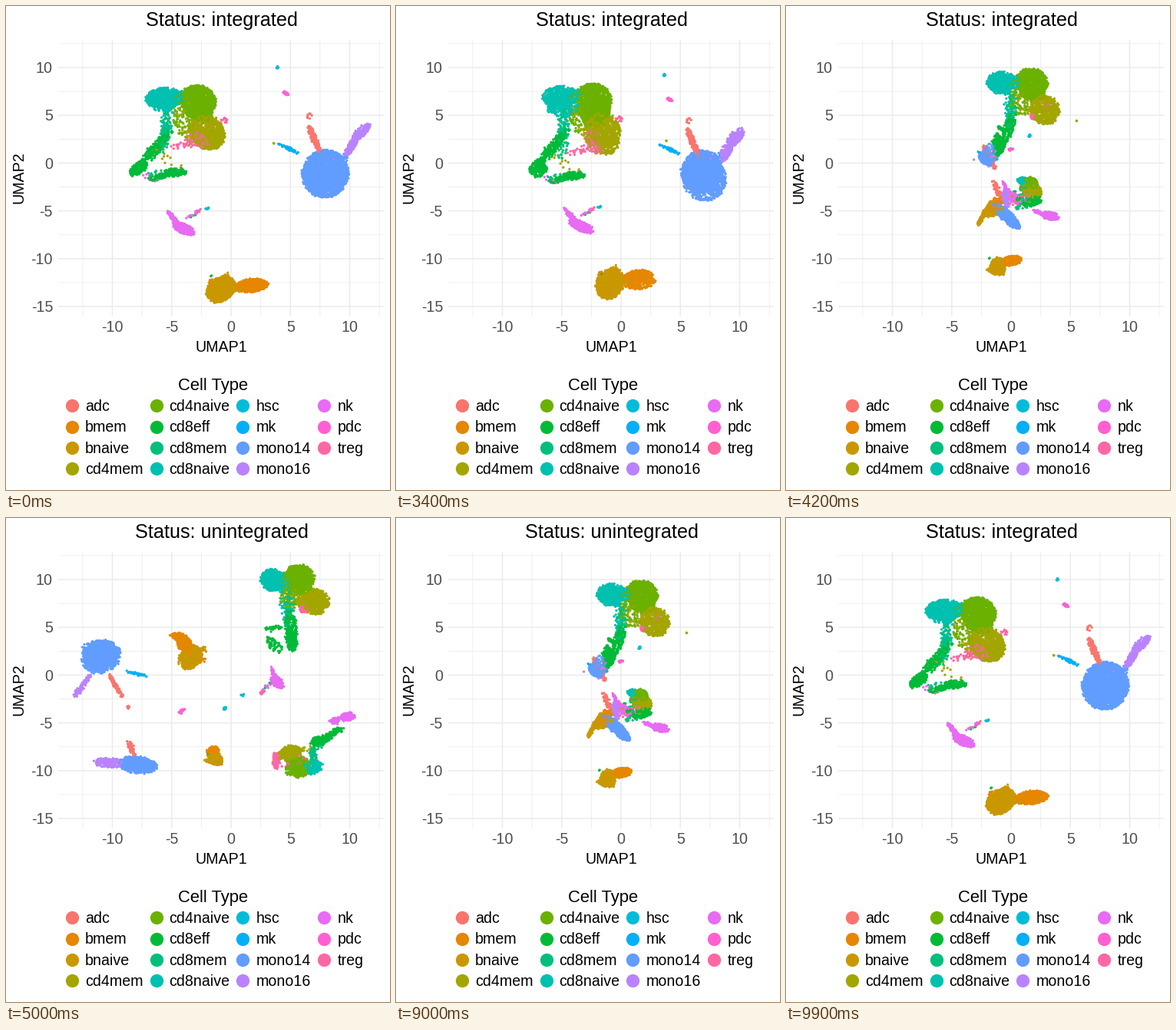
These frames come from a looping animation (500 px wide and 630 px high, 10 s). A matplotlib script:

```python
import numpy as np
import matplotlib.pyplot as plt
from matplotlib.animation import FuncAnimation

W, H, DPI = 500, 630, 100
FRAMES, INTERVAL = 100, 100
PT = 72 / DPI  # points per pixel

COLORS = {
    "adc": "#F8766D", "bmem": "#E58700", "bnaive": "#C99800", "cd4mem": "#A3A500",
    "cd4naive": "#6BB100", "cd8eff": "#00BA38", "cd8mem": "#00BF7D", "cd8naive": "#00C0AF",
    "hsc": "#00BCD8", "mk": "#00B0F6", "mono14": "#619CFF", "mono16": "#B983FF",
    "nk": "#E76BF3", "pdc": "#FD61D1", "treg": "#FF67A4",
}

plt.rcParams["font.family"] = "Liberation Sans"
rng = np.random.default_rng(7)


def px(x):
    return 293 + 15.45 * x


def py(y):
    return 204.5 - 12.44 * y


# Each group of cells fills an ellipse in both embeddings. An ellipse is
# (axis start, axis end, half width); a negative width mirrors it.

def disc(n):
    return np.sqrt(rng.random(n)) * np.exp(2j * np.pi * rng.random(n))


def place(p, ellipse):
    a, b, w = ellipse
    half = (b - a) / 2
    fuzz = min(0.04, abs(w) * 0.4)
    noise = fuzz * (rng.normal(size=p.size) + 1j * rng.normal(size=p.size))
    return (a + b) / 2 + half * p.real + 1j * half / abs(half) * w * p.imag + noise


starts, ends, hues = [], [], []


def cells(kind, n, start, end):
    p = disc(n)
    starts.append(place(0.98 * p, start))
    ends.append(place(0.92 * p + 0.14 * disc(n), end))
    hues.extend([COLORS[kind]] * n)


def spot(c, r=0.1):
    return c - r, c + r, r


# Monocytes
mono = (8.1 + 1.45j, 7.8 - 3.65j, 1.97)
cells("mono14", 1100, mono, (-12 + 0.5j, -9.9 + 3.4j, 1.58))
cells("mono14", 160, (9.6 - 0.9j, 6.3 - 0.9j, 1.8), (-12.5 + 2.9j, -9.6 + 2.9j, 0.75))
cells("mono14", 950, mono, (-9.5 - 9.2j, -6.2 - 9.6j, -0.85))
cells("mono14", 90, (9.6 + 1j, 8.6 - 0.8j, 0.6), (-11.9 + 3.2j, -11 + 0.2j, 0.6))
mono16, tip = (9.6 + 0.7j, 10.7 + 2.9j, 0.28), (10.3 + 2.4j, 11.65 + 4.15j, 0.4)
cells("mono16", 60, mono16, (-11.8 + 0.1j, -12.9 - 1.8j, 0.17))
cells("mono16", 50, tip, (-12.5 - 1.2j, -13.2 - 2.3j, 0.25))
cells("mono16", 120, mono16, (-8.9 - 9.2j, -10.8 - 9.2j, 0.5))
cells("mono16", 150, tip, (-9.8 - 9.2j, -11.5 - 9.1j, 0.5))
cells("mono16", 6, (6.5 - 2j, 9 + 0.5j, 1), (-12 + 1j, -10 + 2j, 0.8))

# Dendritic cells, platelets, progenitors
adc = (6.5 + 4.0j, 7.5 + 1.1j, 0.24)
cells("adc", 90, adc, (-10.35 + 0.2j, -9.1 - 2.4j, 0.15))
cells("adc", 60, adc, (-8.7 - 6.7j, -8.1 - 8.6j, 0.2))
cells("adc", 8, spot(6.6 + 4.9j, 0.3), spot(-8.65 - 3.35j, 0.2))
cells("mk", 38, (3.85 + 2.15j, 5.75 + 1j, 0.1), (-8.9 + 0.45j, -7 - 0.15j, 0.14))
cells("hsc", 10, spot(3.95 + 10j), spot(-0.5 - 3.5j, 0.14))
cells("hsc", 6, (-2.2 - 4.8j, -1.6 - 4.6j, 0.06), (0.8 - 2.1j, 1.4 - 2j, 0.08))
cells("pdc", 26, (4.4 + 7.4j, 4.85 + 7.2j, 0.15), (-4.3 - 4.1j, -4 - 3.5j, 0.18))

# B cells
bmem, bnaive = (0.3 - 13j, 3.1 - 12.6j, 0.68), (-1.6 - 14.5j, -0.1 - 11.9j, 1.1)
cells("bmem", 240, bmem, (-3.4 + 2.1j, -4.4 + 4.3j, 0.62))
cells("bmem", 100, (3 - 12.7j, 1.2 - 12.7j, 0.6), (-5.25 + 4.2j, -3.6 + 3.9j, 0.35))
cells("bmem", 200, bmem, (-2 - 8.2j, -1.1 - 7.6j, 0.4))
cells("bmem", 14, spot(-1.6 - 12.6j, 0.4), (-2.7 + 1.2j, -2 + 1.8j, 0.2))
cells("bnaive", 520, bnaive, (-3.9 + 0.6j, -3 + 3.1j, -0.92))
cells("bnaive", 80, (-1 - 13.6j, 1 - 13.2j, 0.35), (-3.2 + 1.5j, -2.2 + 2.9j, 0.35))
cells("bnaive", 35, (-0.8 - 12.5j, -0.3 - 11.5j, 0.3), (-3.6 + 0.5j, -2.9 + 2j, 0.4))
cells("bnaive", 360, bnaive, (-0.9 - 9.3j, -1.8 - 8.1j, 0.55))
cells("bnaive", 80, (-1.8 - 13.6j, -0.2 - 14.1j, 0.4), (-2.3 - 8.9j, -0.55 - 9.3j, 0.2))

# CD4 T cells
cd4n, cd4m = (-2.9 + 8.15j, -2.6 + 4.6j, 1.5), (-2.5 + 5.0j, -1.5 + 1.4j, 1.45)
cells("cd4naive", 720, cd4n, (5.3 + 11.5j, 6.2 + 8.9j, 1.28))
cells("cd4naive", 130, (-3.7 + 5.3j, -1.5 + 4.7j, 0.8), (4.8 + 9j, 7 + 9.1j, 0.7))
cells("cd4naive", 60, (-4.1 + 7.6j, -2 + 7.8j, 0.4), (4.6 + 11j, 6.5 + 11.2j, 0.35))
cells("cd4naive", 110, (-4.4 + 7.6j, -3.8 + 2.6j, 0.9), (4.6 + 10.2j, 5.1 + 6.8j, 0.8))
cells("cd4naive", 430, cd4n, (4.9 - 10.5j, 6.4 - 8.7j, 1.05))
cells("cd4mem", 560, cd4m, (7.2 + 9j, 7.1 + 6.3j, 1.15))
cells("cd4mem", 70, (-3.4 + 1.9j, -3 + 4.5j, 0.6), (5.8 + 8.7j, 6.3 + 6.9j, 0.5))
cells("cd4mem", 40, (-4.6 + 6.5j, -3 + 2j, 0.8), (5.2 + 9.5j, 6 + 6.8j, 0.8))
cells("cd4mem", 300, cd4m, (4 - 8.6j, 5.9 - 7.8j, 0.8))
cells("cd4mem", 2, spot(3.6 + 2j, 0.08), spot(7.2 + 6.5j))
cells("cd4mem", 12, (-6.6 + 1.5j, -3.9 - 0.6j, 0.8), (5.5 - 8j, 7 - 7.4j, 0.4))
cells("treg", 60, (-3.5 + 1.7j, -2.6 + 3.3j, 0.6), (6.7 + 7.1j, 5.7 + 6.7j, 0.35))
cells("treg", 70, (-2.9 + 3.4j, -2.3 + 1.5j, 0.6), (3.8 - 9.9j, 3.8 - 8j, 0.3))
cells("treg", 12, spot(-0.6 + 4.5j, 0.3), spot(6.3 + 7j, 0.4))
cells("treg", 25, (-5.2 + 1.7j, -3.2 + 2.2j, 0.4), (4.1 - 9.6j, 6.5 - 8.6j, 0.5))

# CD8 T cells
cd8n = (-7.2 + 6.6j, -4.1 + 6.9j, 1.15)
cells("cd8naive", 440, cd8n, (2.45 + 9.9j, 4.5 + 10.1j, 1.15))
cells("cd8naive", 60, (-4.8 + 7.4j, -4 + 6.4j, 0.7), (4.1 + 10.7j, 4.8 + 9.1j, 0.45))
cells("cd8naive", 60, (-6.8 + 6.1j, -5 + 5.8j, 0.6), (2.7 + 9.2j, 4.6 + 9.1j, 0.4))
cells("cd8naive", 45, (-5.2 + 7.5j, -5.5 + 2.5j, 0.5), (4.6 + 9.8j, 4.8 + 5.5j, 0.6))
cells("cd8naive", 190, (-4.1 + 7j, -7.1 + 6.5j, 1.15), (6.4 - 10.2j, 7.4 - 8.9j, 0.75))
cells("cd8mem", 70, (-5.5 + 5.5j, -5.6 + 1.4j, 0.55), (4.8 + 8.8j, 4.9 + 4.8j, 0.55))
cells("cd8mem", 50, (-5.3 + 4.3j, -5.9 + 1j, 0.5), (6.9 - 7.6j, 6.9 - 9.2j, 0.35))
cells("cd8mem", 25, (-7 - 1.2j, -4.2 - 0.8j, 0.4), (6.8 - 8j, 8.2 - 6.6j, 0.3))
lobe = (-7.1 + 0.1j, -8.5 - 1.2j, 0.5)
cells("cd8eff", 150, (-5 + 3.5j, -7.6 - 0.1j, 0.4), (4.9 + 7j, 5.2 + 2.7j, 0.55))
cells("cd8eff", 150, lobe, (5 + 5j, 5.2 + 2.4j, 0.5))
cells("cd8eff", 30, (-5.5 + 3j, -6.2 + 1.6j, 0.4), (2.6 + 4.7j, 4.3 + 5j, 0.25))
cells("cd8eff", 60, (-5.9 + 2.2j, -7.2 + 0.2j, 0.5), (3 + 4j, 4.2 + 2.3j, 0.5))
cells("cd8eff", 80, lobe, (7.2 - 7.4j, 9 - 5.8j, 0.35))
cells("cd8eff", 70, (-7 - 1.7j, -5.3 - 1.2j, 0.3), (7.8 - 6.6j, 9.6 - 5.4j, 0.28))
cells("cd8eff", 130, (-5.7 - 1j, -3.7 - 0.9j, 0.42), (6.7 - 7.2j, 8.2 - 6.5j, 0.45))

# NK cells
core, tail = (-4.9 - 6.3j, -3.1 - 7.4j, 0.48), (-5.35 - 5j, -4.5 - 6.3j, 0.18)
cells("nk", 150, core, (3.5 - 0.1j, 4.3 - 1.4j, 0.45))
cells("nk", 35, tail, (3.4 + 0.8j, 3.8 - 0.4j, 0.18))
cells("nk", 130, core, (9.2 - 4.5j, 10.45 - 4.2j, 0.42))
cells("nk", 35, tail, (8.3 - 4.9j, 9.2 - 4.5j, 0.25))
cells("nk", 10, (-4.2 - 6.2j, -2.6 - 4.8j, 0.08), (3.6 - 0.5j, 2.4 - 2j, 0.2))
cells("nk", 12, (-7.6 - 1.2j, -6 - 1.9j, 0.3), (8.4 - 4.5j, 9 - 5.2j, 0.2))
cells("treg", 9, (-3 - 5.3j, -2.5 - 4.8j, 0.08), (2.4 - 2j, 2.9 - 1.6j, 0.12))
cells("cd8eff", 5, (-3.6 - 5.8j, -2.8 - 5.2j, 0.1), (2.6 - 1.8j, 3.8 + 0.2j, 0.2))
cells("cd8eff", 2, spot(-1.7 - 11.8j, 0.08), spot(-2 - 8.3j))

order = rng.permutation(len(hues))
start = np.concatenate(starts)[order]
end = np.concatenate(ends)[order]
hues = np.array(hues)[order]

fig = plt.figure(figsize=(W / DPI, H / DPI), dpi=DPI, facecolor="white")
ax = fig.add_axes([0, 0, 1, 1])
ax.set(xlim=(0, W), ylim=(H, 0))
ax.axis("off")


def label(x, y, text, size, ha="center", color="black", **kw):
    return ax.text(x, y, text, fontsize=size * PT, ha=ha, va="baseline", color=color, **kw)


def grid(xs, ys, width):
    style = dict(color="#EBEBEB", lw=width * PT, zorder=1, snap=False)
    ax.vlines([px(x) for x in xs], 44, 404, **style)
    ax.hlines([py(y) for y in ys], 68, 492, **style)


grid(np.arange(-12.5, 13, 5), np.arange(-12.5, 13, 5), 0.8)
grid(range(-10, 11, 5), range(-15, 11, 5), 1.5)
for v in range(-15, 11, 5):
    label(61, py(v) + 7, str(v), 19.6, "right", "#4D4D4D")
    if v > -15:
        label(px(v), 424, str(v), 19.6, color="#4D4D4D")

label(280, 450, "UMAP1", 19.6)
label(22, 223.5, "UMAP2", 19.6, rotation=90, rotation_mode="anchor")
label(270, 500, "Cell Type", 22)
title = label(280.5, 26, "", 25.2)

for i, (name, color) in enumerate(COLORS.items()):
    x, y = (85.7, 195.6, 308.2, 414.3)[i // 4], 520.2 + 27.3 * (i % 4)
    ax.scatter(x, y, s=(17.3 * PT) ** 2, color=color, lw=0)
    label(x + 17, y + 6.8, name, 19.7, "left")

dots = ax.scatter(px(start.real), py(start.imag), s=(3.3 * PT) ** 2, c=hues, lw=0, zorder=3)


def update(frame):
    t = np.interp(frame, [33, 50, 82, 99], [0, 1, 1, 0])
    z = start + (end - start) * t
    dots.set_offsets(np.column_stack([px(z.real), py(z.imag)]))
    title.set_text("Status: " + ("unintegrated" if 43 <= frame < 92 else "integrated"))
    return dots, title


anim = FuncAnimation(fig, update, frames=FRAMES, interval=INTERVAL, repeat=True,
                     cache_frame_data=False)
plt.show()
```
